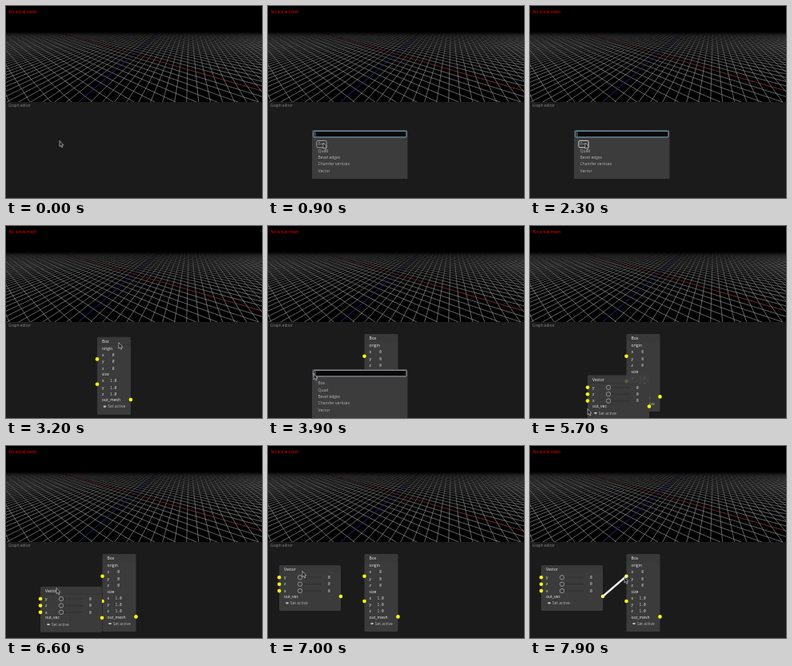
Recreate the animation shown at these times as an HTML page. Size 320 by 240 pixels, loop 8 s.

```html
<!DOCTYPE html>
<html lang="en">
<head>
<meta charset="utf-8">
<title>Node graph editor</title>
<style>
  html, body { margin: 0; width: 100%; height: 100%; overflow: hidden; background: #000; }
  svg { display: block; }
  #stage { width: 100vw; height: 100vh; }
  text { font: 5px "Open Sans", "Noto Sans", sans-serif; fill: #b4b4b4; white-space: pre; }
  .bright { fill: #ececec; }
  .num { font: 4.6px "Noto Sans Mono", "DejaVu Sans Mono", monospace; text-anchor: middle; fill: #d8d8d8; }
  .port { fill: #ff0; }
</style>
</head>
<body>
<svg id="stage" viewBox="0 0 320 240">
  <defs>
    <linearGradient id="fog" x1="0" y1="0" x2="0" y2="1">
      <stop offset=".27" stop-color="#000"/>
      <stop offset=".31" stop-color="#000" stop-opacity=".68"/>
      <stop offset=".42" stop-color="#000" stop-opacity=".32"/>
      <stop offset=".7" stop-color="#000" stop-opacity="0"/>
    </linearGradient>
  </defs>
  <svg width="320" height="120">
    <g id="grid" stroke-width=".65"></g>
    <rect width="320" height="120" fill="url(#fog)"/>
    <text x="3.8" y="8.8" style="font-size:4.8px;fill:#ff0000">No active mesh</text>
  </svg>
  <rect y="120" width="320" height="120" fill="#1b1b1b"/>
  <text x="3" y="125.7" style="font-size:4.7px;fill:#868686">Graph editor</text>
  <g id="box"></g>
  <g id="vector"></g>
  <path id="wire" stroke="#f2f2f2" stroke-width="2.4" stroke-linecap="round"/>
  <g id="menu"></g>
  <path id="cursor" d="M0 0V7.4L1.6 6L2.8 8.5L3.9 8L2.9 5.5H4.9Z" fill="#1c1c1c" stroke="#c4c4c4" stroke-width=".7" stroke-linejoin="round"/>
</svg>
<script>
const $ = id => document.getElementById(id);
const LOOP = 8000, STEP = 100;

// Markup helpers: y is the visual middle of the line
const label = (x, y, s, cls = '') => `<text x="${x}" y="${y + 1.7}" class="${cls}">${s}</text>`;
const port = (x, y) => `<circle class="port" cx="${x}" cy="${y}" r="2.3"/>`;
const rect = (x, y, w, h, attrs) => `<rect x="${x}" y="${y}" width="${w}" height="${h}" ${attrs}/>`;

// Ground plane seen with 60° field of view, 30° pitch and 30° yaw
const EYE = 16, HALF = 60;
const FOCAL = HALF / Math.tan(Math.PI / 6), DEEP = FOCAL / Math.cos(Math.PI / 6);

// One family of parallel lines: shared vanishing point, even spacing on the lower edge
function fan(angle, axisColor) {
  const dx = DEEP * Math.tan(angle);
  const gap = 2 * FOCAL / (EYE * Math.cos(angle));
  const line = (k, color) => `<path d="M${160 + dx} 0L${160 - dx + k * gap} 120" stroke="${color}"/>`;
  let lines = '';
  for (let k = -180; k <= 180; k++) if (k) lines += line(k, '#9a9a9a');
  return [lines, line(0, axisColor)];
}
const fans = [fan(-Math.PI / 3, '#b04444'), fan(Math.PI / 6, '#3838c0')];
$('grid').innerHTML = fans.map(f => f[0]).join('') + fans.map(f => f[1]).join('');

function frame(title, w, h) {
  return `<path d="M0 10V1.5Q0 0 1.5 0H${w - 1.5}Q${w} 0 ${w} 1.5V10Z" fill="#404040" fill-opacity=".84"/>` +
    `<path d="M0 10H${w}V${h - 1.5}Q${w} ${h} ${w - 1.5} ${h}H1.5Q0 ${h} 0 ${h - 1.5}Z" fill="#3b3b3b"/>` +
    label(6, 5.3, title, 'bright');
}
const setActive = (x, y) =>
  `<ellipse cx="${x}" cy="${y}" rx="1.9" ry="1.1" fill="#c8c8c8"/>` + label(x + 3.7, y, 'Set active');

const triple = (top, value) => [...'xyz'].map((axis, i) =>
  label(6, top + i * 8.3, axis, 'bright') + label(20.2, top + i * 8.3, value, 'num')).join('');

$('box').innerHTML = frame('Box', 42, 97) +
  label(6, 14.5, 'origin', 'bright') + triple(22.5, '0') +
  label(6, 47, 'size', 'bright') + triple(55, '1.0') +
  label(6, 79, 'out_mesh', 'bright') + setActive(9.5, 87) +
  port(0, 27.7) + port(0, 59) + port(42, 78.4);

$('vector').innerHTML = frame('Vector', 77, 57) +
  [...'yzx'].map((axis, i) => {
    const y = 15.3 + i * 8.4;
    return label(6, y, axis, 'bright') + rect(23, y - 1.2, 30, 2.4, 'rx="1" fill="#353535"') +
      `<circle cx="26" cy="${y}" r="2.7" fill="#3b3b3b" stroke="#b4b4b4" stroke-width=".7"/>` +
      label(62.5, y, '0', 'num') + port(0, y);
  }).join('') +
  label(6, 39, 'out_vec', 'bright') + setActive(10, 47.3) + port(77, 39);

const items = ['Box', 'Quad', 'Bevel edges', 'Chamfer vertices', 'Vector'];
const itemY = i => 17.5 + i * 8.37;
$('menu').innerHTML = rect(0, 0, 119.5, 61, 'rx="1" fill="#3c3c3c"') +
  rect(1.8, 1.3, 116.2, 7.6, 'id="field" rx="1" fill="#080808" stroke-width="1"') +
  rect(3.6, 2.4, .7, 5.4, 'fill="#8fc4dc"') +
  rect(6, 0, 12, 8.4, 'id="mark" rx="1.2" fill="#2c2c2c" stroke-width=".9"') +
  items.map((s, i) => label(7.6, itemY(i), s)).join('');

// Places the pointer visits
const add = ([x, y], dx, dy) => [x + dx, y + dy];
const menus = [
  { at: [55, 155], open: 200, hover: 900, pick: 2400, item: 0, markW: 12 },
  { at: [55, 179], open: 3700, hover: 4600, pick: 5700, item: 4, markW: 19 }
];
const aim = m => add(m.at, 8.5 + m.markW * .45, itemY(m.item) - 1.5);
const spawn = m => add(m.at, 17, 7.5);
const boxGrip = p => add(p, 27, 7), vectorGrip = p => add(p, 20, 1.5);
const boxEnd = [120.5, 135], vectorEnd = [14, 149];
const output = add(vectorEnd, 77, 39), input = add(boxEnd, 0, 27.7);

// Moves: start, end, destination and how far the path sags
const boxDrag = [2700, 3350, boxEnd, 0];
const vectorDrag = [6400, 6800, vectorEnd, 8];
const pointerMoves = [
  [0, 200, menus[0].at],
  [600, 900, aim(menus[0])],
  [2400, 2700, boxGrip(spawn(menus[0]))],
  boxDrag.with(2, boxGrip(boxEnd)),
  [3350, 3550, add(menus[1].at, 1, 2)],
  [3800, 4400, aim(menus[1])],
  [5900, 6400, vectorGrip(spawn(menus[1]))],
  vectorDrag.with(2, vectorGrip(vectorEnd)),
  [6900, 7300, output],
  [7400, 7900, add(input, -2.5, 1)]
];

function follow(from, moves, t) {
  let pos = from;
  for (const [start, end, to, sag = 0] of moves) {
    if (t <= start) break;
    const p = Math.min(1, (t - start) / (end - start)), e = p * p * (3 - 2 * p);
    pos = [pos[0] + (to[0] - pos[0]) * e, pos[1] + (to[1] - pos[1]) * e + sag * 4 * e * (1 - e)];
  }
  return pos;
}
const show = (id, on) => $(id).setAttribute('display', on ? 'inline' : 'none');
const move = (id, [x, y]) => $(id).setAttribute('transform', `translate(${x} ${y})`);

function drawMenu(t) {
  const m = menus.find(m => t >= m.open && t < m.pick);
  show('menu', m);
  if (!m) return;
  move('menu', m.at);
  $('field').setAttribute('stroke', t < m.open + 300 ? '#a9a9b8' : '#7fb0c8');
  show('mark', t >= m.hover);
  const mark = $('mark');
  mark.setAttribute('y', itemY(m.item) - 4.1);
  mark.setAttribute('width', m.markW);
  mark.setAttribute('stroke', t < m.hover + 500 ? '#b4b4b4' : '#f4f4f4');
}

function draw(t) {
  const tip = follow([67, 168.3], pointerMoves, t);
  show('box', t >= menus[0].pick);
  show('vector', t >= menus[1].pick);
  move('box', follow(spawn(menus[0]), [boxDrag], t));
  move('vector', follow(spawn(menus[1]), [vectorDrag], t));
  drawMenu(t);
  show('wire', t >= 7500);
  $('wire').setAttribute('d', `M${output}L${t < 7800 ? tip : input}`);
  move('cursor', tip);
}

const begin = performance.now();
function tick() {
  const t = (performance.now() - begin) % LOOP;
  draw(Math.floor(t / STEP) * STEP);
  requestAnimationFrame(tick);
}
draw(0);
requestAnimationFrame(tick);
</script>
</body>
</html>
```
